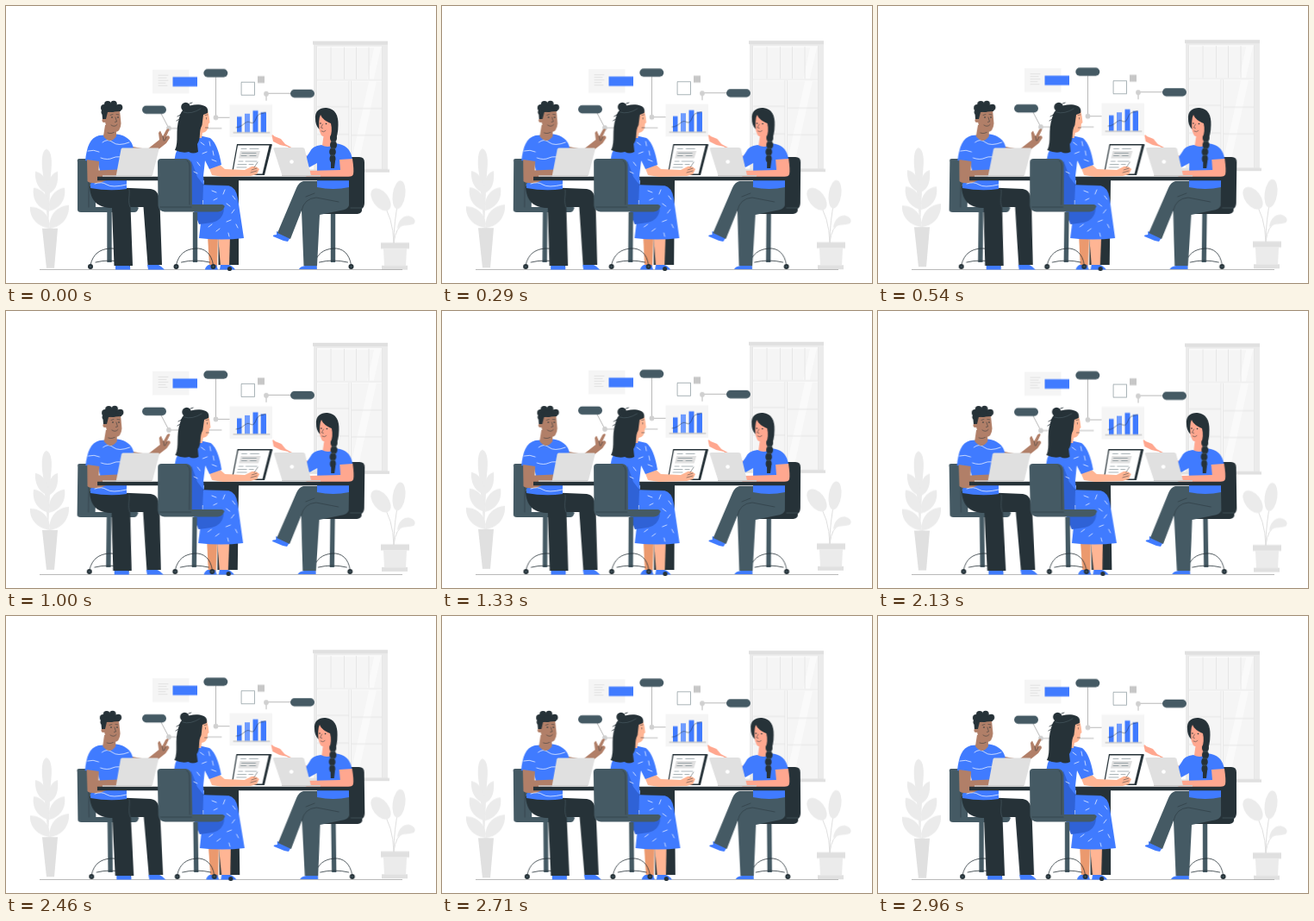
An HTML page without scripts for the animation above (3000 ms loop, 499x321 px).

```html
<!DOCTYPE html>
<html lang="en">
<head>
<meta charset="utf-8">
<title>Team meeting</title>
<style>
html, body { margin: 0; width: 100%; height: 100%; overflow: hidden; background: #fff; }
svg { display: block; width: 100vw; height: 100vh; }
.float { animation: rise 1.5s cubic-bezier(.37, 0, .63, 1) infinite alternate; }
.sway { transform-origin: 0 205px; animation: sway 1.5s -.75s cubic-bezier(.37, 0, .63, 1) infinite alternate; }
@keyframes rise { from { transform: translateY(-.3px); } to { transform: translateY(-5.4px); } }
@keyframes sway { from { transform: skewX(.85deg); } to { transform: skewX(-.85deg); } }
.blue { fill: #407bff; }
.navy { fill: #2f62d6; }
.dark { fill: #263238; }
.slate { fill: #455a64; }
.brown { fill: #b17f68; }
.peach { fill: #ffa78f; }
.sand { fill: #ffb594; }
.g1 { fill: #f5f5f5; }
.g2 { fill: #ebebeb; }
.g3 { fill: #e0e0e0; }
.line { fill: none; stroke: #263238; stroke-width: .8; stroke-linecap: round; stroke-linejoin: round; }
.thin { stroke-width: .5; }
.pale { stroke: #fff; stroke-width: .7; }
.grey { stroke: #a6a6a6; }
.seam { stroke: #53666f; }
</style>
</head>
<body>
<svg viewBox="0 0 499 321" preserveAspectRatio="none">
<defs>
  <g id="base">
    <path class="slate" d="M-2.700 0h5.400v58h-5.400z"/>
    <path class="line" d="M-22 61C-19 48-11 43 0 42S19 48 21 61M-16 58Q0 54 17 58"/>
    <circle class="dark" cx="-22" cy="63" r="3"/>
    <circle class="dark" cx="21" cy="63" r="3"/>
    <circle class="slate" cx="-22" cy="63" r="1"/>
    <circle class="slate" cx="21" cy="63" r="1"/>
  </g>
  <rect id="pill" class="slate" width="28" height="9.400" rx="4.700"/>
</defs>

<g class="float">
  <!-- window -->
  <path class="g2" d="M357 44h86v147h-86z"/>
  <path class="g3" d="M356 41h87v4h-87zM345 189.500h100v3.500H345z"/>
  <path fill="#fafafa" d="M360 47h77v142h-77z"/>
  <path class="g1" d="M362 49h74v36h-74zM362 88h36v101h-36zM401 88h35v101h-35z"/>
  <path fill="#fff" d="M427 49h8l-8 36h-8zM421 88h9l-22 101h-7v-10z" opacity=".5"/>
  <path fill="none" stroke="#e3e3e3" stroke-width=".8" d="M377 48v37M392.500 48v37M406.500 48v37M421 48v37M361 86h75M398 87v102M400.500 87v102M361 117h37M401 119h35M361 149h37M401 150h35M360.500 47v142M436.500 47v142"/>

  <!-- left plant -->
  <g class="g2">
    <path d="M47 166C41 168 41 182 43 195L49 258 52 195C54 180 53 168 47 166z"/>
    <path d="M34 192C33 204 38 214 49 218 50 206 45 194 34 192zM60 192C61 204 59 214 49 218 48 206 51 194 60 192z"/>
    <path d="M32 211C30 224 37 235 50 238 52 224 44 212 32 211zM68 211C70 224 63 235 50 238 48 224 56 212 68 211z"/>
    <path d="M28 233C27 245 36 256 51 258 52 244 42 233 28 233zM73 231C74 244 66 256 51 258 49 243 59 232 73 231z"/>
  </g>
  <path class="g3" d="M42 258h18l-4 46h-9z"/>

  <!-- right plant -->
  <path fill="none" stroke="#dedede" d="M436 228Q449 244 450 275M456 222Q450 250 450 275M463 252Q452 256 450 275"/>
  <g class="g2">
    <ellipse cx="435" cy="224.500" rx="9" ry="15" transform="rotate(-38 435 224.500)"/>
    <ellipse cx="456" cy="219" rx="7.300" ry="16.500" transform="rotate(8 456 219)"/>
    <path d="M454 258C455 248 462 242 469 244 475 246 476 250 473 253 467 255 461 253 454 258z"/>
  </g>
  <path class="g3" d="M435 274.500h33v7h-33zM436 301h30v5h-30z"/>
  <path class="g2" d="M438 281.500h27l-1 20h-25z"/>
</g>
<path stroke="#9b9b9b" stroke-width=".7" d="M39 305.500H460"/>

<!-- boards -->
<g class="float">
  <path class="line grey" d="M180 125L189 142H250M243.500 83v46.500H260M331 101.500h-29v8"/>
  <path class="g1" d="M170 74h42.500v27.500H170zM259.500 114.500h49.500v37.500h-49.500z"/>
  <path class="line grey thin" opacity=".5" d="M177 80.500h11M177 83.500h9M177 86.500h11M177 89.500h8M177 92.500h10"/>
  <path class="blue" d="M193.500 82.500H222v11h-28.500zM268 128.500h5.500v18H268zM286.500 121.500h6v25h-6zM295.700 123.500h6.300v23h-6.300z"/>
  <path fill="#6f9cff" d="M277 125h6v21.500h-6z"/>
  <path class="line thin" d="M267 141C275 141 278 132 283 135 290 139 289 128 294 125.500L301 123.500"/>
  <path class="line grey" d="M264 147h42"/>
  <path fill="#c7c7c7" d="M292 81.500h8V89.500h-8z"/>
  <path class="line thin seam" d="M273.500 88.500h15v15h-15z"/>
  <g fill="#d0d0d0"><circle cx="189" cy="142" r="2.900"/><circle cx="243.500" cy="129.500" r="2.900"/><circle cx="302" cy="102" r="2.900"/></g>
  <use href="#pill" x="158" y="115.800"/>
  <use href="#pill" x="229.300" y="73.300"/>
  <use href="#pill" x="330" y="97"/>
</g>

<g class="sway">
  <!-- man -->
  <use href="#base" x="120" y="239"/>
  <path class="slate" d="M85 177h14Q104 178 104 184v50H83v-53Q82 177 85 177zM83 233h69q3 0 1 3-1 3-4 3H87q-4 0-4-3z"/>
  <path class="line thin" d="M93 178q3 2 3 6v49"/>
  <path class="blue" d="M127 300h15q3 2 2 5.500h-17zM164 300h13q4 2 7 5.500h-19z"/>
  <path class="dark" d="M97 209L168 212C176 213 178 220 178.500 229L181 300H164.500L159.500 233H144.500L147 301H125.500L123 234C109 234 98 228 97 209z"/>
  <path class="line seam thin" d="M143 213C144 219 141 226 144 233"/>
  <path class="brown" d="M147 163L164 166 178 155 177 147 179 144.500 182 151 186 143.500Q189 141 189.500 143.500L186 151Q190 149 190 153L186 159 172 170 147 184z"/>
  <path class="line thin" d="M182 151l1 5M186 152l-2 4"/>
  <path class="blue" d="M108 150C97 153 94 163 92 179L107 182 110 196 98 206 98 211Q120 215 140 212L140 190 147 180 147.500 163Q144 151 129 148.500z"/>
  <path class="brown" d="M94 178L108 180 107.500 190.500 130 189.500V196L109 205Q97 206 94.500 203z"/>
  <path class="line pale" d="M112 158q6-5 12 0t19 0M95 168q7-2 13 1M110 176q8 3 14 0t17 1M103 206q8-3 14 1t23 0"/>
  <path class="brown" d="M115 138H128V151Q121 161 113 151z"/>
  <path class="line thin" d="M118 147q5 2 9-2"/>
  <path class="brown" d="M115 121H132L133.500 136Q133 146 126 146 116 145 115 134z"/>
  <circle class="brown" cx="114" cy="132.500" r="2.500"/>
  <g class="dark">
    <path d="M111 119Q121 109 134 117L133 122 118 123 116 131 112 131z"/>
    <circle cx="114" cy="118" r="4"/><circle cx="118" cy="114" r="4"/><circle cx="125" cy="113.500" r="3.800"/><circle cx="131.500" cy="117.500" r="3.800"/><circle cx="113.500" cy="123" r="3"/><circle cx="123" cy="119" r="4"/>
    <circle cx="123" cy="129" r=".8"/><circle cx="130" cy="129" r=".8"/>
  </g>
  <path class="line thin" d="M121 126.500l3-1M128 125.500l3 .5M127 129l1.500 5-2 .5M122 138q4 3 7-.5"/>

  <!-- woman on the right -->
  <use href="#base" x="379.500" y="239"/>
  <path class="dark" d="M395 175h15Q416 175 416 181V228Q416 233 413 235 414 240 408 241H366q-5 0-4-4l33-5z"/>
  <path class="line seam thin" d="M400 234h13"/>
  <path class="blue" d="M314 261l16 7-3 5-5-1-12-5q-1-2 4-2zM347 299h13l1 6h-21q1-3 7-4z"/>
  <path class="slate" d="M345 203H398V231Q397 236 388 237L364 242 361 301H345.500L343 237 330 270 315 263 337 211Q340 204 345 203z"/>
  <path class="line thin" d="M343 237Q346 223 360 222L386 227M348 221l10-4"/>
  <path class="peach" d="M345 184L327 163 318 161 310 157 308.500 150Q309 148 311.500 151L319 154 324 160 350 174z"/>
  <path class="peach" d="M369 147h10L384 162Q376 167 367 162zM363 127Q363 121 371 121T380 129L378 149Q371 154 366 150 361 141 363 127z"/>
  <path class="blue" d="M366 161Q355 162 352 170L345 180 352 187 361 182V210Q380 214 398 210V182L402 178Q400 163 387 160L382 159Q375 166 366 161z"/>
  <path class="peach" d="M387 178L402 177Q404 190 403 195 402 198 397 198H349L345 195 350 191 388 190z"/>
  <path class="dark" d="M359 131C358 121 365 117.500 372 118 382 119 386 127 385.500 138 385.500 146 384 152 382 156L376 153C378 148 378.500 142 377 136 372 134 367 131 365 126 363 130 363 136 363.500 143 360 139 359 135 359 131z"/>
  <g class="dark">
    <ellipse cx="380" cy="153" rx="4" ry="5"/><ellipse cx="380" cy="161" rx="4" ry="5"/><ellipse cx="379" cy="169" rx="3.800" ry="5"/><ellipse cx="379" cy="177" rx="3.500" ry="5"/><path d="M377 180h5l-1 8h-4z"/>
    <circle cx="365" cy="136" r=".8"/><circle cx="371.500" cy="136.500" r=".8"/>
  </g>
  <path class="line seam thin" d="M377 157h6M376 165h7M376 173h6"/>
  <path class="line thin" d="M367.500 137l-2 4 2 .5M366 145q3 2 5-.5"/>

  <!-- table -->
  <path class="dark" d="M230 201h40v99h-23.500v-91H230zM106 197.700h298v4.500H106z"/>
  <path class="g3" d="M135 164.500h41.500q1.500 0 1 1.500l-8 32H127.500l6-32q.5-1.500 1.500-1.500z"/>
  <path fill="#c7c7c7" d="M112 196.300h57v1.400h-57z"/>
  <path class="g3" d="M312 164h32q2 0 2.500 1.500L354 196.500H320.500L310.500 165.500q0-1.500 1.500-1.500z"/>
  <path fill="#c7c7c7" d="M320 196h45v1.600h-45z"/>
  <circle cx="331.500" cy="180.500" r="2.300" fill="#fff"/>

  <!-- document -->
  <path class="dark" d="M268 160h40q1 0 .7 1.300L300 196H261.500z"/>
  <path fill="#fff" d="M269 161.500h36.500L297.500 194.500h-34.500z"/>
  <path class="g3" d="M272 168h23l-2.500 8.500h-22.500z"/>
  <path class="line thin seam" d="M273 165.500h6m4 0h10M274 170.500h16M273 173.500h6m4 0h7M270 180h5m3 0h13M269 183.500h10m3 0h5M268 187h11"/>

  <!-- woman in the middle -->
  <path fill="#eb996e" d="M234 266h12l-1 36h-9z"/>
  <path class="sand" d="M246 266h14l-1 36h-10z"/>
  <path class="blue" d="M235 300h9l2 5.500h-15q0-3 4-5.500zM249 300h10q5 2 7 5.500h-18z"/>
  <path class="sand" d="M235 186L247 183 254 189 277 190 285 186Q290 185 294 189L291 195 284 197 252 198 239 196z"/>
  <path class="line thin" d="M285 190l6-2M284 193l7-2M288 187l4-6"/>
  <path class="blue" d="M199 166Q194 175 196 190L205 225H229L224 269Q250 272 276 269L269 223Q267 210 258 208L230 207 229 197 231 179 236 189 250 184Q246 160 237 153L224 150z"/>
  <path class="navy" d="M215 179L222 198 229 207 228 236 253 235Q252 248 239 251L224 253 215 230z"/>
  <path class="line pale" d="M226 158l4 3M236 157l1 5M228 171l5-2M240 168l1 5M222 181l3 4M239 178l5 2M218 192l4 2M239 214l5 2M254 213l-2 5M263 220l3 4M241 225l4-2M256 229l4 3M265 236l-3 4M235 256l4-3M256 250l5-2M267 253l2 4M244 261l4-3M258 263l1 4"/>
  <path class="line thin" d="M229 207l29 1"/>
  <path class="sand" d="M220 121H234Q236 128 236.500 135L235 136.500Q235 146 228 147L227 153H216z"/>
  <path class="line thin" d="M231 126.500l3-.5M232.500 129.500v1.500M231.500 141h3"/>
  <path class="dark" d="M201 130C203 118 214 113 226 114.500 234 116 235 120 234 124L229 126 227.500 138C223 146 227 153 222 160L223 169Q217 172 212 169 205 171 196 167C201 157 196 145 201 130z"/>
  <circle class="dark" cx="208.500" cy="117" r="5.300"/>
  <path class="line" d="M204 125l-5 3M204 129l-6 4M213 113l3-1"/>
  <path class="line thin seam" d="M206 123q9 3 20-4"/>
  <use href="#base" x="219.500" y="239"/>
  <circle class="dark" cx="259.500" cy="304.500" r="2.600"/>
  <path class="slate" d="M180 177h29Q215 178 215.500 184L216 230h35q4 1 2 4-2 4-7 4.500H184Q177 238 176.500 231L176 181Q176 177 180 177z"/>
  <path class="line thin" d="M179 233h36M210 179q3 2 3 6v45"/>
</g>
</svg>
</body>
</html>
```
